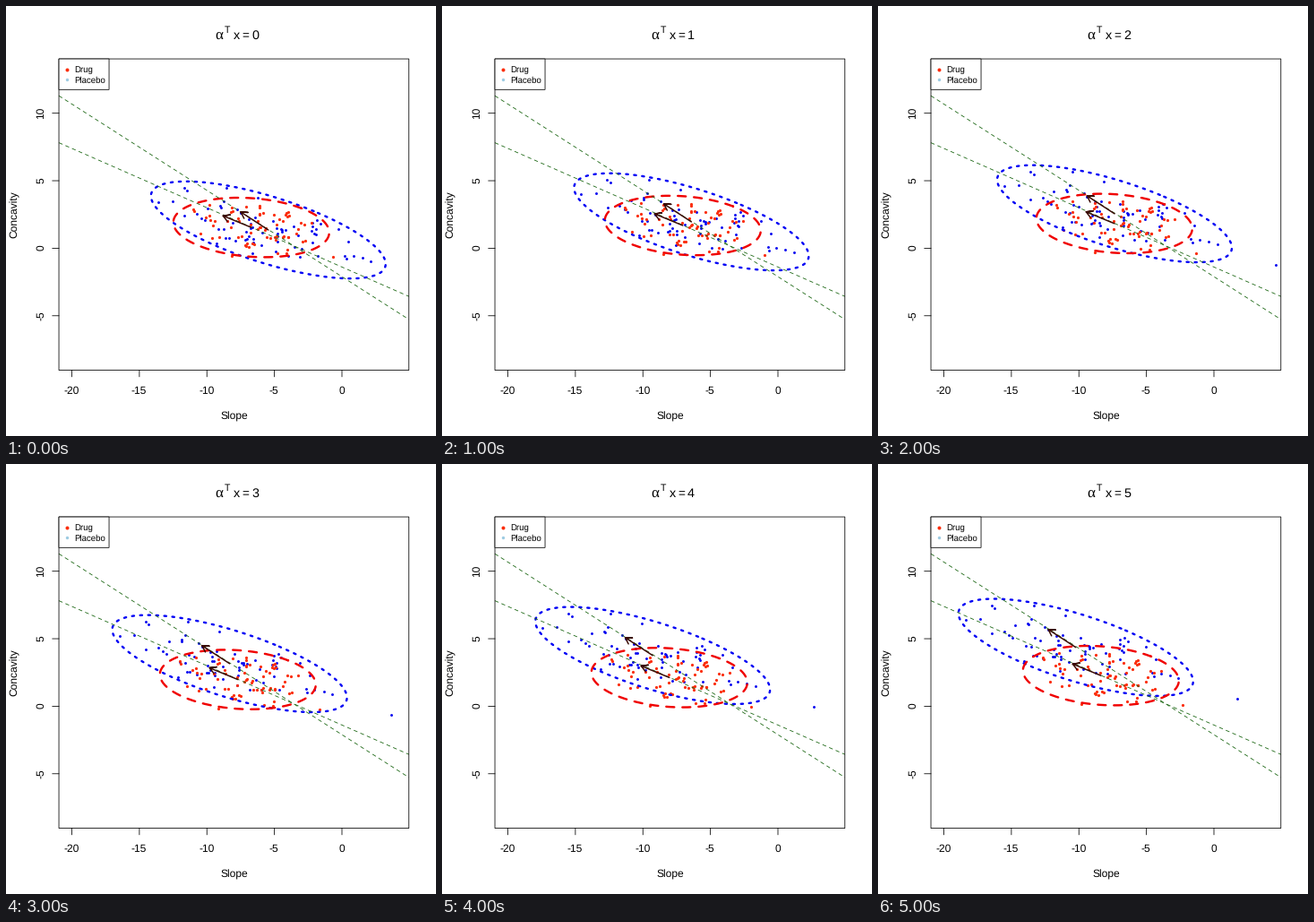
Recreate the animation shown at these times as a matplotlib script. Size 480 by 480 pixels, loop 6 s.

```python
import numpy as np
import matplotlib.pyplot as plt
from matplotlib.animation import FuncAnimation
from matplotlib.patches import Rectangle

SIZE = 480
LEFT, RIGHT, TOP, BOTTOM = 59.04, 449.76, 59.04, 406.56
UNIT = 15.074                 # pixels per data unit on both axes
X0, Y0 = 375.0, 270.4         # pixel position of the data origin
THIN = 0.8

plt.rcParams["font.family"] = "Liberation Sans"
plt.rcParams["text.hinting"] = "none"
fig = plt.figure(figsize=(SIZE / 72, SIZE / 72), dpi=72, facecolor="white")
ax = fig.add_axes([0, 0, 1, 1])
ax.set_xlim(0, SIZE)
ax.set_ylim(SIZE, 0)
ax.axis("off")


def box(width, height, **kw):
    return ax.add_patch(Rectangle((LEFT, TOP), width, height, ec="black",
                                  lw=THIN, snap=False, **kw))


def stroke(x, y, color="black", lw=THIN, **kw):
    return ax.plot(x, y, color=color, lw=lw, **kw)[0]


def label(x, y, s, size=12, ha="center", **kw):
    return ax.text(x, y, s, fontsize=size, ha=ha, va="baseline",
                   rotation_mode="anchor", **kw)


def ellipse(half, corr, t, r=1.0):
    """Points of a tilted ellipse given its half extents and correlation."""
    d = np.arccos(-corr)
    return np.column_stack([half[0] * r * np.cos(t + d / 2),
                            -half[1] * r * np.cos(t - d / 2)])


class Group:
    """A scatter cloud with its spread ellipse and direction arrow."""

    def __init__(self, center, step, half, corr, count, outliers, seed,
                 color, ring_color, dash, tip, size):
        self.center, self.step = np.array(center), np.array(step)
        rng = np.random.default_rng(seed)
        cloud = ellipse(half, corr, rng.uniform(0, 2 * np.pi, count),
                        rng.uniform(0.08, 0.9, count))
        ring = ellipse(half, corr, np.linspace(0, 2 * np.pi, 300))

        back = np.arctan2(-tip[1], -tip[0])
        left, right = (np.add(tip, (8 * np.cos(back + a), 8 * np.sin(back + a)))
                       for a in (-np.pi / 6, np.pi / 6))
        arrow = [(0, 0), tip, left, tip, right]

        dots = stroke([], [], color, ls="", marker="o", ms=size, mew=0,
                      zorder=3)
        dots.set_clip_path(frame)
        outline = stroke([], [], ring_color, 2.4, ls=(0, dash),
                         dash_capstyle="round", zorder=5)
        pointer = stroke([], [], "#3a0a04", 1.5, solid_capstyle="round",
                         solid_joinstyle="round", zorder=7)
        self.parts = [(dots, np.vstack([cloud, outliers])),
                      (outline, ring), (pointer, np.array(arrow))]

    def move(self, n):
        for line, shape in self.parts:
            line.set_data(*(shape + self.center + n * self.step).T)
        return [line for line, _ in self.parts]


frame = box(RIGHT - LEFT, BOTTOM - TOP, fill=False, zorder=8)

groups = [
    Group(center=(292.8, 250), step=(-14.4, -9.06), half=(131, 54.2),
          corr=0.70, count=66, seed=4, size=2.9, tip=(-30.7, -20),
          outliers=[(180, 57), (-123, -31), (-94, -47), (-47, -47),
                    (-58, 15), (105, 31)],
          color="#0000f0", ring_color="#0000f5", dash=(0.95, 2.8)),
    Group(center=(273.8, 247.2), step=(-5.0, -2.2), half=(87, 33.2),
          corr=0.17, count=64, seed=9, size=3.2, tip=(-31.5, -13),
          outliers=[(91, 33), (-22, 32), (38, -14), (-64, -18),
                    (39, 29), (9, -22)],
          color="#fb2d0b", ring_color="#f00000", dash=(3.75, 3.75)),
]

# Paths followed by the two group means
for y1, y2 in ((100.2, 349.9), (152.6, 324.2)):
    stroke([LEFT, RIGHT], [y1, y2], "#206a18", 0.85, ls=(0, (5.2, 4.2)),
           dash_capstyle="butt", zorder=6)

# Axes
for v in range(-20, 1, 5):
    x = X0 + v * UNIT
    stroke([x, x], [BOTTOM, BOTTOM + 7.2], snap=False)
    label(x - 0.4, 433, str(v))
for v in range(-5, 11, 5):
    y = Y0 - v * UNIT
    stroke([LEFT - 7.2, LEFT], [y, y], snap=False)
    label(42, y - 0.4, str(v), rotation=90)
label(254.4, 462, "Slope")
label(12.6, 232.8, "Concavity", rotation=90)

# Legend
box(56, 34.3, fc="white", zorder=9)
for y, name, color, size in ((70.6, "Drug", "#fb2d0b", 4),
                             (82.2, "Placebo", "#9ccbe2", 3.4)):
    stroke([67.6], [y], color, ls="", marker="o", ms=size, mew=0, zorder=10)
    label(76, y + 3.5, name, 9.6, "left", zorder=10)

# Title
label(233, 37, "α", 17, "left", family="Liberation Serif")
label(243.3, 30.5, "T", 10.5, "left")
label(254.2, 37, "x", 14.4, "left")
label(263.6, 37, "=", 13.5, "left")
digit = label(274, 37, "0", 14.4, "left")


def update(n):
    digit.set_text(str(n))
    return [digit] + [line for g in groups for line in g.move(n)]


anim = FuncAnimation(fig, update, frames=6, interval=1000,
                     init_func=lambda: update(0), repeat=True,
                     repeat_delay=0, blit=False)
plt.show()
```
